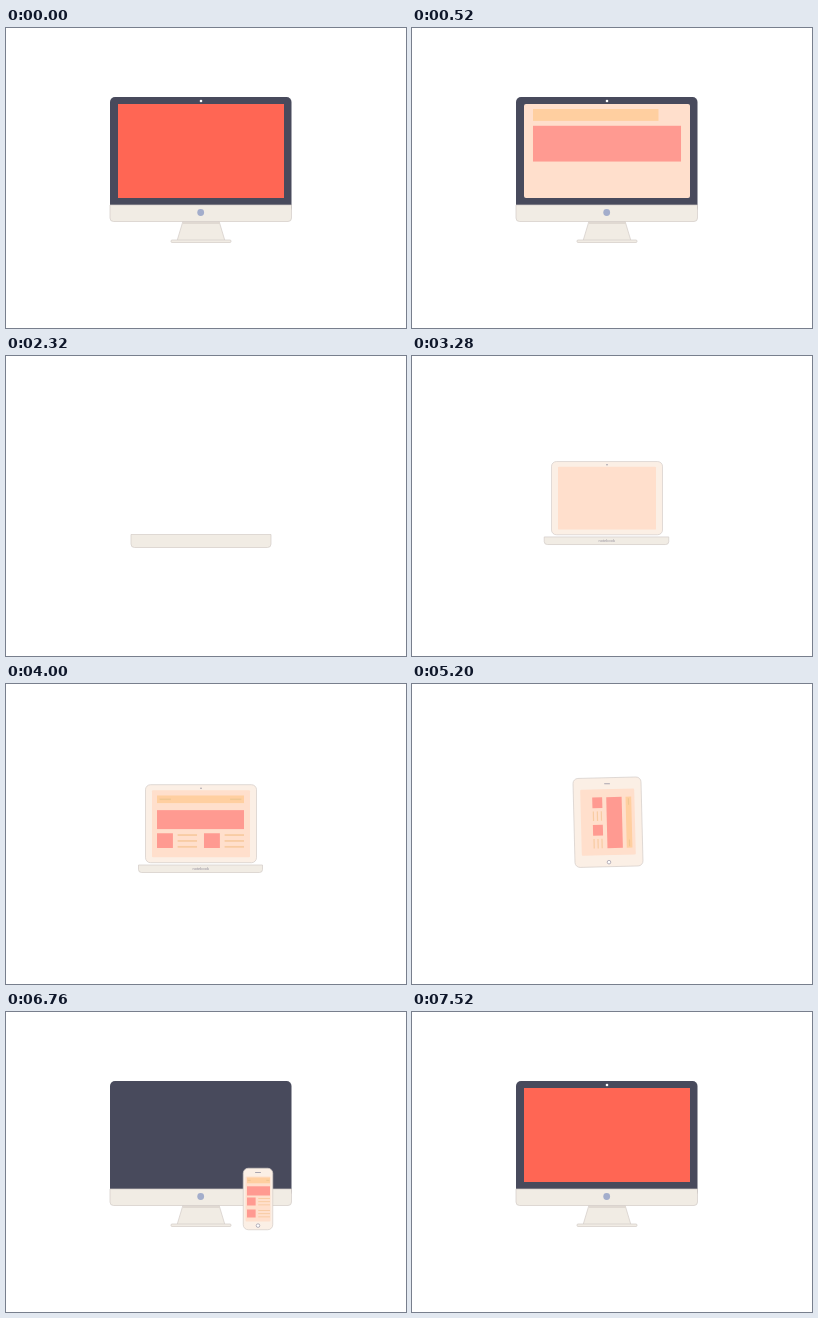
An HTML page for the animation above (7.56 s loop, 400 by 300 pixels).

```html
<!DOCTYPE html>
<html lang="en">
<head>
<meta charset="utf-8">
<title>Responsive devices</title>
<style>
html, body { margin: 0; width: 100%; height: 100%; overflow: hidden; background: #fff; }
svg { display: block; width: 100%; height: 100%; }
text { font: 4px "Liberation Sans", Arial, sans-serif; }
</style>
</head>
<body>
<svg id="stage" viewBox="0 0 400 300"></svg>
<script>
const LOOP = 7560;
const CX = 196, CY = 138.2;
const stage = document.getElementById('stage');
const C = {
  shell: '#f1ece4', glass: '#fbefe5', edge: '#d3ccc8', dark: '#484a5c', page: '#ffdfcc',
  red: [255, 102, 84], hero: [255, 154, 145], head: '#ffcfa0', tag: '#efc793', line: '#f8cba2', mark: '#a3adcb'
};

// Page layouts: x, y, width, height, air under the header, stacking (0 two columns, 1 one column)
const DESK = [121, 81, 148, 82, .06, 0];
const LAPTOP = [-44, -28.2, 87, 52.5, .134, 0];
const WIDE = [-25, -23.8, 51, 39, .1, 0];
const TALL = [-22, -29, 44, 62, .09, 1];
const PHONE = [-11, -21.5, 23, 40, .075, 1];

const clamp = v => Math.max(0, Math.min(1, v));
const linear = v => v;
const inOut = v => v < .5 ? 4 * v ** 3 : 1 - 4 * (1 - v) ** 3;
const out = v => 1 - (1 - v) ** 3;
const span = (t, a, b, ease = inOut) => ease(clamp((t - a) / (b - a)));
const lerp = (a, b, k) => a + (b - a) * k;
const mix = (a, b, k) => a.map((v, i) => lerp(v, b[i], k));
const rgb = c => `rgb(${c.map(Math.round)})`;

const outline = `stroke="${C.edge}" stroke-width=".7"`;
const rect = (x, y, w, h, fill, r = 0, extra = '') => w > 0 && h > 0
  ? `<rect x="${x}" y="${y}" width="${w}" height="${h}" rx="${r}" fill="${fill}" ${extra}/>` : '';
const middle = (w, h, fill, r, extra) => rect(-w / 2, -h / 2, w, h, fill, r, extra);
const dot = (x, y, r, fill, extra = '') => `<circle cx="${x}" cy="${y}" r="${r}" fill="${fill}" ${extra}/>`;
const group = (transform, body) => `<g transform="${transform}">${body}</g>`;
const squash = (y, k, body) => group(`translate(0 ${y * (1 - k)}) scale(1 ${k})`, body);
const pop = (x, y, w, h, fill, k) => rect(x + w * (1 - k) / 2, y + h * (1 - k) / 2, w * k, h * k, fill);

const SCREEN = [112, 76, 166, 94];

// k brings in the small parts, heroK the banner; reveal shrinks the banner from the full screen
function page([x, y, w, h, air, stack], k, heroK = 1, reveal = 1) {
  const part = i => out(clamp(k * 2.2 - i * .24));
  const head = h * .145, top = head + h * air;
  const bottom = h * lerp(.64, .45, stack);
  const row = h * lerp(.82 - .75 * air, .5, stack);
  const box = lerp(h - row, h * .2, stack);
  const dx = w * .54 * (1 - stack), dy = h * .3 * stack;
  const indent = box * 1.4;
  const banner = mix(SCREEN, [x, y + top, w, bottom - top], reveal);

  let s = rect(x, y, w * part(0), head, C.head);
  for (const at of [.03, .84]) s += rect(x + w * at, y + head * .4, w * .13 * part(4), head * .2, C.tag);
  s += pop(...banner, rgb(mix(C.red, C.hero, reveal)), heroK);
  for (let i = 0; i < 2; i++) {
    const bx = x + dx * i, by = y + row + dy * i;
    s += pop(bx, by, box * 1.08, box, rgb(C.hero), part(2 + i));
    for (let j = 0; j < 3; j++) {
      s += rect(bx + indent, by + box * (.06 + .4 * j), (w - dx - indent) * part(3 + i + j / 2), box * .12, C.line);
    }
  }
  return s;
}

function bar([x, y, w, h], r) {
  return `<path d="M${x} ${y}h${w}v${h - r}q0 ${r} ${-r} ${r}h${2 * r - w}q${-r} 0 ${-r} ${-r}z" fill="${C.shell}" ${outline}/>`;
}

// The stand and screen fold into the chin, which becomes the laptop base
function desktop(t) {
  const back = t > 5000;
  const past = (a, b) => back ? 0 : span(t, a, b);
  const lit = back ? span(t, 6780, 7120) : 1;
  const leave = 1 - past(1240, 1580);
  const shrink = past(1880, 2330);

  const foot = `<path d="M177 193H213L219 213H171Z" fill="${C.shell}" ${outline}/>` +
    rect(165, 212, 60, 2.5, C.shell, 1, outline) + rect(177, 194, 37, 2, '#e0d9d2');
  let screen = rect(104, 69, 181.5, 116, C.dark, 5) + dot(195, 73, 1.3 * lit, '#fff');
  screen += back
    ? pop(...SCREEN, rgb(C.red), lit)
    : rect(...SCREEN, C.page, 2) +
      page(DESK, Math.min(span(t, 360, 1120, linear), leave), leave, span(t, 30, 560));

  let chin = mix([104, 177, 181.5, 16.5], [125, 178.5, 140, 13], shrink);
  chin = mix(chin, [128, 180, 133, 9], past(2320, 2490));
  const rise = back ? 250 * (1 - span(t, 6440, 6740, out)) : 0;
  return group(`translate(0 ${rise})`,
    squash(194, 1 - past(1600, 1920), foot) +
    squash(178, 1 - past(1600, 2040), screen) +
    bar(chin, 3.5) + dot(194.7, 184.5, 3.4 * (1 - shrink), C.mark));
}

// The lid opens, fills and contracts into a tablet lying on its side
function laptop(t) {
  const open = span(t, 2860, 3420);
  const morph = span(t, 4030, 4420);
  const label = open * (1 - span(t, 4030, 4160));
  const base = mix(mix([128, 180, 133, 9], [132.5, 181, 124, 7.5], open), [194.5, 172, 2, 0], morph);
  const lid = middle(...mix([111, 78], [89, 68], morph), C.glass, 5, outline) +
    middle(...mix([98, 67], [66, 54], morph), C.page, 1) +
    dot(0, -35.5, .8 * (1 - morph), '#9b98a4') +
    page(mix(LAPTOP, WIDE, morph), span(t, 3360, 3980, linear), span(t, 3400, 3700, out));
  const x = lerp(195, CX, morph), y = lerp(139.7, CY, morph);
  return (base[3] > 3 ? bar(base, Math.min(3, base[3] / 2)) : '') +
    `<text x="194.7" y="186" text-anchor="middle" fill="#8f8b98" opacity="${label}">notebook</text>` +
    squash(180, open, group(`translate(${x} ${y})`, lid));
}

// The tablet turns upright, its page reflows, then it slims to a phone and moves aside
function handheld(t) {
  const turn = span(t, 4930, 5252);
  const reflow = span(t, 5230, 5660);
  const slim = span(t, 5700, 6260);
  const move = span(t, 6280, 6640);
  const leave = span(t, 7220, 7500, v => v * v);
  const keys = span(t, 4400, 4620);
  const x = lerp(CX, 252, move) + 165 * leave;
  const y = lerp(lerp(CY, 151.3, slim), 187, move);
  const body = middle(...mix([68, 89], [29.5, 61.5], slim), C.glass, 5, outline) +
    middle(...mix([54, 66], [25, 45], slim), C.page, 1) +
    rect(-3, lerp(-39, -27, slim), 6, 1, '#aaa5af', .5, `opacity="${keys}"`) +
    dot(0, lerp(40, 26.6, slim), 1.8, '#fff', `stroke="#a5a0ac" stroke-width=".8" opacity="${keys}"`) +
    group(`rotate(${90 * (1 - reflow)})`, page(mix(mix(WIDE, TALL, reflow), PHONE, slim), 1));
  return group(`translate(${x} ${y}) rotate(${90 * (turn - 1)})`, body);
}

function draw(t) {
  let s = '';
  if (t < 2500 || t > 6440) s += desktop(t);
  if (t >= 2500 && t < 4420) s += laptop(t);
  if (t >= 4420 && t < 7510) s += handheld(t);
  stage.innerHTML = s;
}

const start = performance.now();
function tick() {
  draw((performance.now() - start) % LOOP);
  requestAnimationFrame(tick);
}
tick();
</script>
</body>
</html>
```
